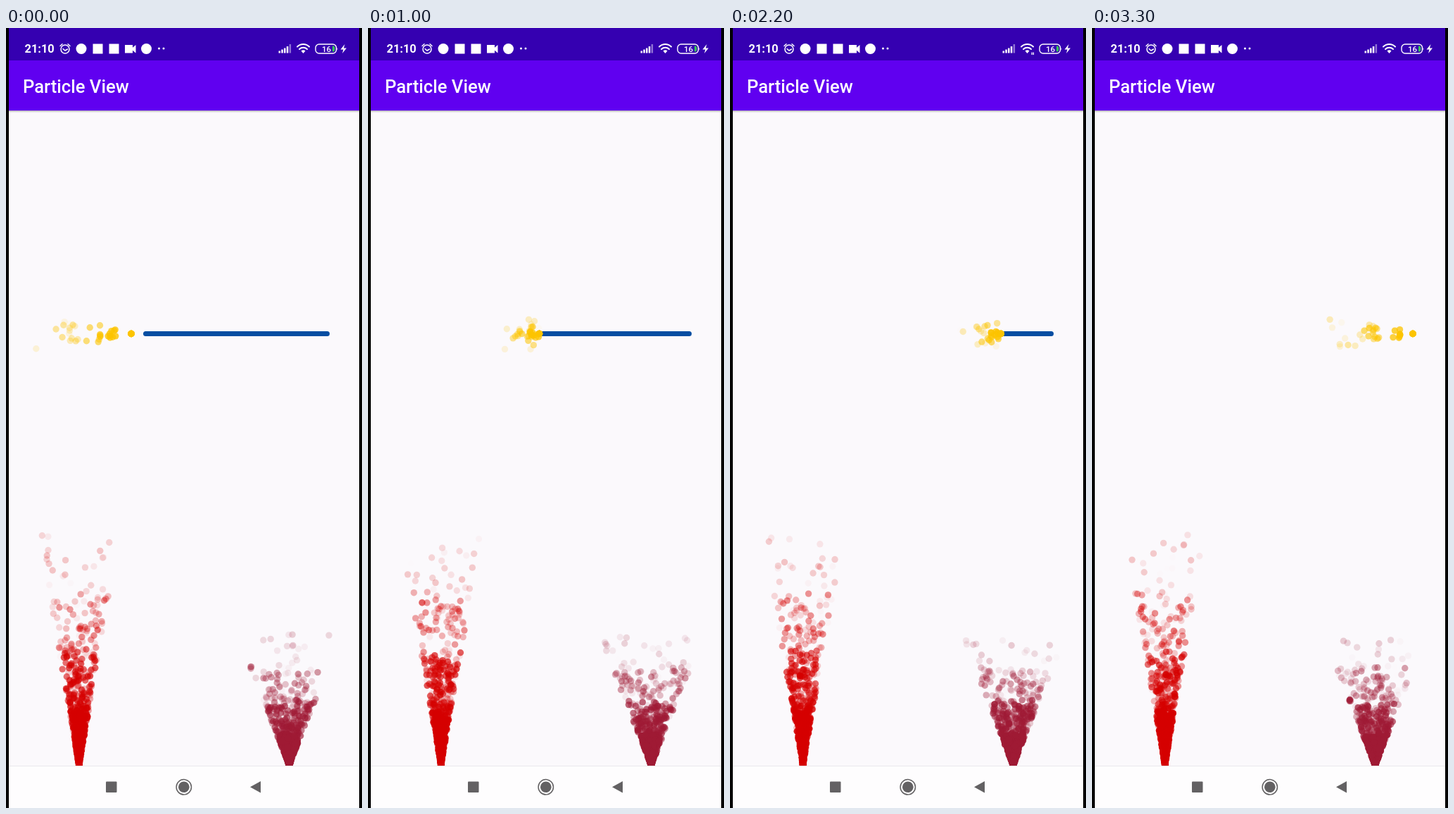
Write an HTML page with a canvas that moves like this. It is 506 px wide and 1106 px high and loops after 3400 ms.

```html
<!DOCTYPE html>
<html lang="en">
<head>
<meta charset="utf-8">
<title>Particle View</title>
<style>
  html, body { margin: 0; width: 506px; height: 1106px; overflow: hidden; background: #000; }
  svg, canvas { position: absolute; left: 0; top: 0; display: block; }
  text { font-family: Roboto, sans-serif; fill: #fff; }
</style>
</head>
<body>
<svg width="506" height="1106" viewBox="0 0 506 1106">
  <defs>
    <linearGradient id="shade" x2="0" y2="1">
      <stop stop-color="#000" stop-opacity=".28"/>
      <stop offset="1" stop-color="#000" stop-opacity="0"/>
    </linearGradient>
  </defs>
  <rect x="4" width="498" height="1106" fill="#fbf9fc"/>
  <rect x="4" width="498" height="46" fill="#3500b1"/>
  <rect x="4" y="46" width="498" height="71" fill="#6000f0"/>
  <rect x="4" y="117" width="498" height="3" fill="url(#shade)"/>
  <text x="24" y="92" font-size="25.6" font-weight="500">Particle View</text>

  <!-- status bar -->
  <text x="26.5" y="35" font-size="16.4" font-weight="700">21:10</text>
  <g fill="none" stroke="#fff" stroke-width="1.5" stroke-linecap="round">
    <circle cx="84" cy="30" r="6"/>
    <path d="M81 29.5l3 2.5 3.5-2M77 25.5l3-2.7M91 25.5l-3-2.7"/>
    <path d="M414 26.5a12 12 0 0 1 17 0M417 30a8 8 0 0 1 11 0" stroke-width="2"/>
    <rect x="440" y="23" width="29.5" height="13" rx="5" stroke-width="1.4"/>
  </g>
  <g fill="#fff">
    <circle cx="107" cy="29.5" r="7.5"/>
    <rect x="123.5" y="22.5" width="14" height="14"/>
    <rect x="146.5" y="22.5" width="14" height="14"/>
    <path d="M169 24h11v3.8l4.5-3.8v11.5l-4.5-3.8v3.8h-11z"/>
    <circle cx="199.5" cy="29.5" r="7.5"/>
    <circle cx="217.5" cy="29" r="1.5"/>
    <circle cx="224" cy="29" r="1.5"/>
    <path d="M387.5 32.5h2.5v3h-2.5zM391.3 30.5h2.5v5h-2.5zM395 28.5h2.5v7h-2.5zM398.8 26h2.5v9.5h-2.5z"/>
    <path d="M402.6 23h2.5v12.5h-2.5z" opacity=".45"/>
    <path d="M419.5 32.5a4.5 4.5 0 0 1 6 0l-3 3.5z"/>
    <path d="M470.5 27.5q1.5 2 0 4z"/>
    <path d="M481.5 23l-6 7.5h4l-1.5 5.5 6-7.5h-4z"/>
    <path id="traffic" d="M428.5 34.5h1.3v3.5h-1.3zM430.7 34.5h1.3v3.5h-1.3z"/>
  </g>
  <path d="M464 25.5h2q1.5 1 1.5 4t-1.5 4h-2z" fill="#35c759"/>
  <text x="449" y="34" font-size="11.5" font-weight="500">16</text>

  <!-- navigation bar -->
  <rect x="4" y="1046" width="498" height="60" fill="#fefdfe"/>
  <rect x="4" y="1046" width="498" height="1" fill="#ebe9ec"/>
  <g fill="#636163">
    <rect x="142" y="1068.5" width="15.5" height="15.5" rx="1"/>
    <circle cx="252.8" cy="1076.3" r="7.8"/>
    <circle cx="252.8" cy="1076.3" r="10.7" fill="none" stroke="#636163" stroke-width="1.5"/>
    <path d="M347 1076.3l15-8.3v16.6z"/>
  </g>
</svg>
<canvas id="stage" width="506" height="1046"></canvas>
<script>
const STEP = 100, COUNT = 34, RADIUS = 4.7;
const LINE_Y = 433.5, LINE_END = 456.5;
const ctx = document.getElementById('stage').getContext('2d');
const traffic = document.getElementById('traffic');

// [step, x] of the progress head
const keys = [[-6, 70], [-2, 156], [-1, 178], [0, 198.5], [1, 224], [2, 243.5],
  [10, 243.5], [12, 286], [13, 312], [14, 338], [15, 358], [17, 379], [20, 385],
  [28, 386], [30, 415], [31, 438], [32, 456], [33, LINE_END]];

function headX(step) {
  const i = Math.max(1, keys.findIndex(k => k[0] >= step));
  const [s0, x0] = keys[i - 1], [s1, x1] = keys[i];
  return x0 + (x1 - x0) * (step - s0) / (s1 - s0);
}

function random(seed) {
  return () => {
    seed = seed + 0x6D2B79F5 | 0;
    let t = Math.imul(seed ^ seed >>> 15, 1 | seed);
    t ^= t + Math.imul(t ^ t >>> 7, 61 | t);
    return ((t ^ t >>> 14) >>> 0) / 4294967296;
  };
}

function dot(x, y, alpha) {
  if (alpha <= 0) return;
  ctx.globalAlpha = Math.min(1, alpha);
  ctx.beginPath();
  ctx.arc(x, y, RADIUS, 0, 2 * Math.PI);
  ctx.fill();
}

// Each step releases one batch, which spreads and fades as it ages.
function batches(step, life, salt, color, drawBatch) {
  ctx.fillStyle = color;
  for (let age = life; age > 0; age--) {
    const born = (step - age + COUNT) % COUNT;
    drawBatch(age, random(born * 7919 + salt));
  }
  ctx.globalAlpha = 1;
}

function fountain(step, x, speed, spread, salt, color) {
  batches(step, 4, salt, color, (age, rnd) => {
    for (let i = 0; i < 210; i++) {
      const pace = speed * rnd() ** 1.5, slope = spread * (2 * rnd() - 1);
      const d = pace * (age - 0.2 * rnd());
      dot(x + d * slope, 1046 - d, 1.14 - age * 0.23 - rnd() * 0.13 * (age - 1));
    }
  });
}

function sparks(step) {
  batches(step, 5, 101, '#fcc400', (age, rnd) => {
    const x = headX(step - age);
    for (let i = 0; i < 9; i++) {
      const d = (age - 1) * 14 * rnd() ** 1.3;
      const dy = (age - 1) * 6 * (2 * rnd() - 1);
      dot(x - d, LINE_Y + dy, 1.15 - age * 0.17 - rnd() * 0.09 * (age - 1));
    }
  });
}

function progress(step) {
  const x = headX(step);
  if (x >= LINE_END) return;
  ctx.strokeStyle = '#064ea2';
  ctx.lineWidth = 7;
  ctx.lineCap = 'round';
  ctx.beginPath();
  ctx.moveTo(x, LINE_Y);
  ctx.lineTo(LINE_END, LINE_Y);
  ctx.stroke();
}

function frame() {
  const step = Math.floor(performance.now() / STEP) % COUNT;
  ctx.clearRect(0, 0, 506, 1046);
  progress(step);
  sparks(step);
  fountain(step, 103.7, 84, 0.175, 11, '#d50000');
  fountain(step, 402.5, 47, 0.4, 57, '#9f1a35');
  traffic.style.display = step > 16 && step < 29 ? '' : 'none';
  requestAnimationFrame(frame);
}
requestAnimationFrame(frame);
</script>
</body>
</html>
```
